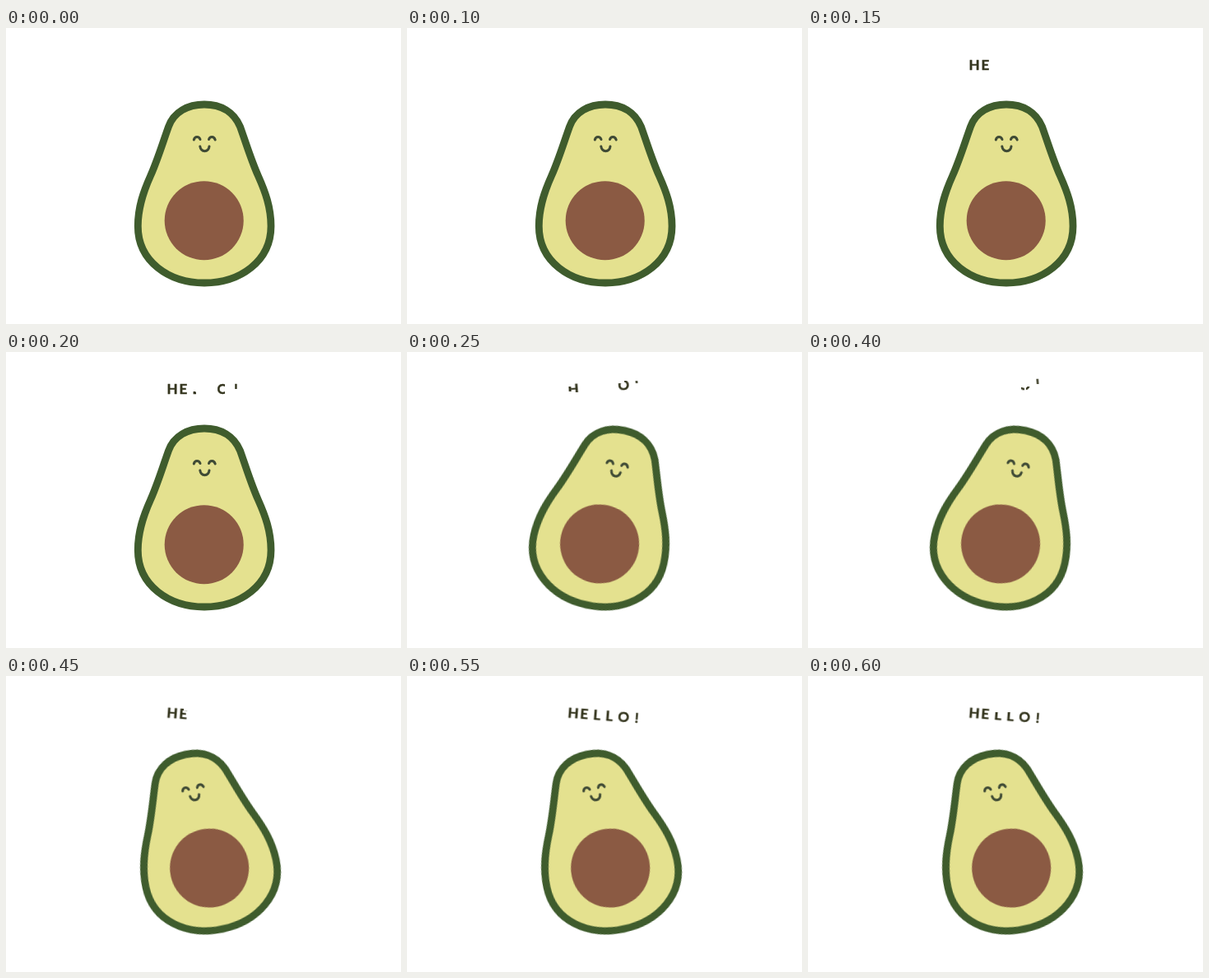
Write an HTML page without scripts that moves like this. It is 480 px wide and 360 px high and loops after 650 ms.

```html
<!DOCTYPE html>
<html lang="en">
<head>
<meta charset="utf-8">
<title>Hello avocado</title>
<style>
  html, body { margin: 0; width: 100%; height: 100%; overflow: hidden; background: #fff; }
  svg { position: absolute; left: 0; top: 0; width: 480px; height: 360px; }

  .avocado, .word, .reveal { animation: 650ms step-end infinite; }
  .avocado { animation-name: sway; transform-origin: 241px 203px; }
  .word { animation-name: tilt; transform-origin: 202px 45px; }
  .reveal { animation-name: reveal; }

  .flesh { fill: #e4e18f; stroke: #3f5c2d; stroke-width: 8.8; }
  .pit { fill: #8b5a43; }
  .face { fill: none; stroke: #3f4a35; stroke-width: 3; stroke-linecap: round; }
  .word { font: 700 17px Lato, "Open Sans", sans-serif; fill: #35361f; stroke: #35361f; stroke-width: .4; }

  @keyframes sway {
    0% { transform: rotate(0deg); }
    38.46% { transform: rotate(12.3deg); }
    69.23% { transform: rotate(-12deg); }
  }
  @keyframes tilt {
    0% { transform: rotate(0deg); }
    38.46% { transform: rotate(-4.5deg); }
    69.23% { transform: rotate(4.5deg); }
  }
  /* The greeting flickers in as broken pieces, then types out whole. */
  @keyframes reveal {
    0% { clip-path: path("M0 0z"); }
    23.07% { clip-path: path("M190 30h32v30h-32z"); }
    30.76% { clip-path: path("M190 30h32v30h-32z M227 48h4v5h-4z M255 30h11v30h-11z M274 30h10v15h-10z"); }
    38.46% { clip-path: path("M196 42h7v6h-7z M203 38h6v11h-6z M255 38h9v9h-9z M264 35h10v12h-10z M274 35h10v3h-10z"); }
    53.84% { clip-path: path("M259 43h4v4h-4z M265 42h5v4h-5z M274 32h10v7h-10z"); }
    69.23% { clip-path: path("M190 30h26v12h8v18h-34z"); }
    76.92% { clip-path: path("M190 30h64v30h-64z"); }
    84.61% { clip-path: path("M190 30h104v35h-104z"); }
    92.3% { clip-path: path("M190 30h34v14h30v-14h40v35h-104z"); }
  }
</style>
</head>
<body>
<svg viewBox="0 0 480 360">
  <g class="avocado">
    <path class="flesh" d="M241 93C261 93 277 102 284.5 120C292 141 298 161 306.5 180C315 199 322 218 322 241C322 284 284 310 241 310C198 310 160.3 284 160.3 241C160.3 218 167 199 175.5 180C184 161 190 141 197.5 120C204 102 221 93 241 93Z"/>
    <circle class="pit" cx="240.7" cy="234.2" r="48"/>
    <path class="face" d="M228.3 136C229.5 131.5 234.5 131.5 236 135.5M246.5 135.5C247.8 131.5 252.8 131.5 254.2 136M235.8 144C237 151.5 246 151.5 247 144"/>
  </g>
</svg>
<svg class="reveal" viewBox="0 0 480 360">
  <text class="word" x="195.6 210.6 226.6 241.6 256.5 277" y="51">HELLO!</text>
</svg>
</body>
</html>
```
